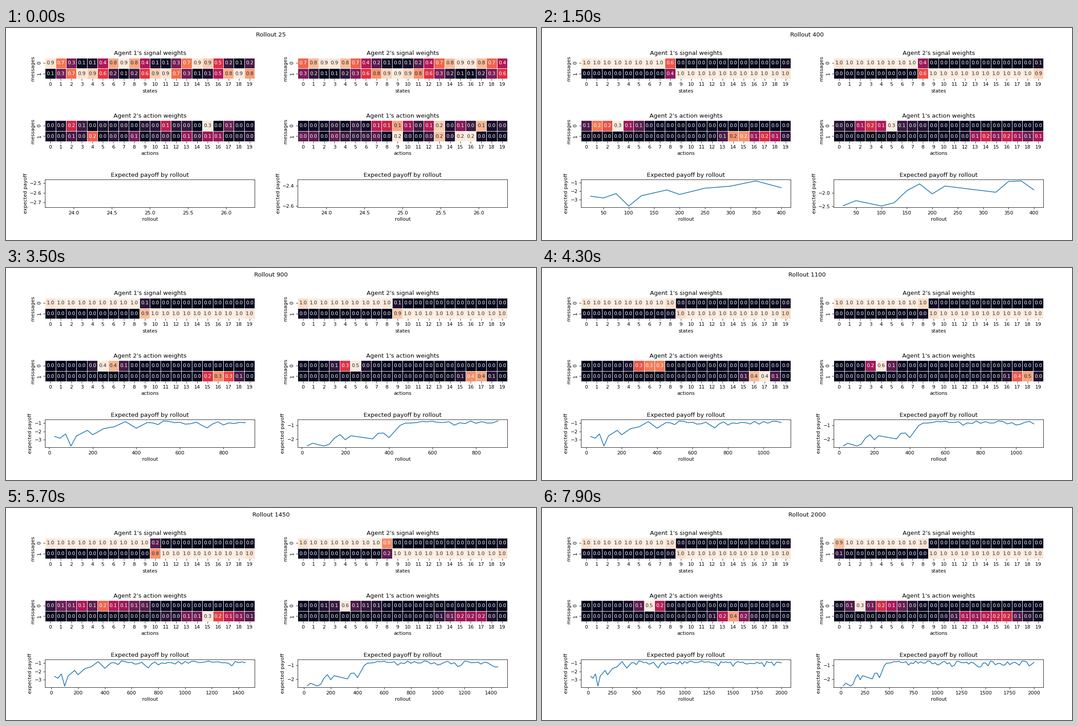
These frames come from a looping animation (1183 by 473 pixels, 8 s). A matplotlib script:

```python
import numpy as np
import matplotlib.pyplot as plt
from matplotlib.animation import FuncAnimation
from matplotlib.colors import LinearSegmentedColormap

W, H = 1183, 473
DPI = W / 15
FRAMES, STEP, N = 80, 25, 20
STATES = np.arange(N)
LEARNED = 15                                  # frames until behaviour settles
TIMES = [400, 700, 1100, 1450, 1675, 2000]    # rollouts of the key points

plt.rcParams.update({"font.family": "DejaVu Sans", "font.size": 10})
ROCKET = LinearSegmentedColormap.from_list("rocket", [
    "#03051a", "#35193e", "#701f57", "#ad1759",
    "#e13342", "#f37651", "#f6b48f", "#faebdd"])


def wander(rng, shape):
    """Noise over time, slightly smoothed between frames."""
    z = rng.normal(size=(FRAMES + 2,) + shape)
    return (z[:-2] + 1.5 * z[1:-1] + z[2:]) / 2


def progress(n):
    return min(n / LEARNED, 1)


def signal_rule(seed, cuts, period, peak):
    """A wave of preferences that settles into one cut between messages."""
    wave = .5 + .45 * np.cos(2 * np.pi * (STATES - peak) / period)
    start = np.log(wave / (1 - wave))
    edge = np.isin(STATES, [0, N - 1])
    noise = wander(np.random.default_rng(seed), (N,)) * np.where(edge, .6, .3)

    def values(n):
        cut = np.interp(STEP * (n + 1), TIMES, cuts)
        goal = np.clip(7 * (cut - STATES), -6, 6) * np.where(edge, .6, 1)
        g = progress(n)
        p = 1 / (1 + np.exp(-(1 - g) * start - g * (goal + noise[n])))
        return np.array([p, 1 - p])
    return values


def action_rule(seed, low, high, widths):
    """Random weights that gather into one moving bump per message."""
    rng = np.random.default_rng(seed)
    start = rng.normal(0, 1.1, (2, N))
    noise = wander(rng, (2, N)) * .4

    def values(n):
        t = STEP * (n + 1)
        centers = np.array([[np.interp(t, TIMES, c)] for c in (low, high)])
        width = np.interp(t, TIMES, widths)
        goal = -((STATES - centers) / width) ** 2 / 2 + noise[n]
        g = progress(n)
        w = np.exp((1 - g) * start + g * np.maximum(goal, -5))
        return w / w.sum(1, keepdims=True)
    return values


def payoff_curve(seed, points, best, spread):
    """Early climb through a few points, then a noisy plateau."""
    t = STEP * np.arange(1, FRAMES + 1)
    x, y = zip(*points)
    plateau = -best - np.random.default_rng(seed).gamma(2.5, spread, FRAMES)
    return np.where(t <= x[-1], np.interp(t, x, y), plateau)


def text_color(rgba):
    c = rgba[:3]
    lin = np.where(c <= .03928, c / 12.92, ((c + .055) / 1.055) ** 2.4)
    return ".15" if lin @ [.2126, .7152, .0722] > .408 else "w"


fig = plt.figure(figsize=((W + 1e-6) / DPI, (H + 1e-6) / DPI), dpi=DPI,
                 facecolor="white")
heading = fig.suptitle("")


def add_axes(x, y, h, title, xlabel, ylabel):
    ax = fig.add_axes([x / W, 1 - (y + h) / H, 467.9 / W, h / H])
    ax.set(title=title, xlabel=xlabel, ylabel=ylabel)
    return ax


class Heatmap:
    def __init__(self, x, y, title, xlabel, values):
        self.values = values
        ax = add_axes(x, y, 46.8, title, xlabel, "messages")
        self.mesh = ax.pcolormesh(np.zeros((2, N)), cmap=ROCKET,
                                  edgecolors="white", linewidth=.5)
        ax.set(xlim=(0, N), ylim=(2, 0))
        ax.set_xticks(STATES + .5, STATES)
        ax.set_yticks([.5, 1.5], [0, 1], rotation="vertical")
        ax.spines[:].set_visible(False)
        self.labels = [ax.text(c + .5, r + .5, "", ha="center", va="center")
                       for r in range(2) for c in range(N)]

    def draw(self, n):
        data = self.values(n)
        self.mesh.set_array(data)
        self.mesh.set_clim(data.min(), data.max())
        colors = self.mesh.to_rgba(data).reshape(-1, 4)
        for label, v, rgba in zip(self.labels, data.flat, colors):
            label.set_text(f"{v:.1f}")
            label.set_color(text_color(rgba))


class Curve:
    def __init__(self, x, payoff):
        self.payoff = payoff
        self.ax = add_axes(x, 338.4, 61.6, "Expected payoff by rollout",
                           "rollout", "expected payoff")
        self.line, = self.ax.plot([], [], color="C0", lw=1.5)

    def draw(self, n):
        self.line.set_data(STEP * np.arange(1, n + 2), self.payoff[:n + 1])
        self.ax.relim()
        self.ax.autoscale_view()


def column(x, me, other, signals, acts, payoff):
    return [
        Heatmap(x, 66.7, f"Agent {me}'s signal weights", "states", signals),
        Heatmap(x, 206.4, f"Agent {other}'s action weights", "actions", acts),
        Curve(x, payoff),
    ]


left = column(
    87.3, 1, 2,
    signal_rule(3, [8.1, 9.1, 8.5, 9.8, 8.8, 8.5], period=7.3, peak=-.3),
    action_rule(4, low=[2.5, 5.4, 5.9, 4.5, 6, 6],
                high=[15.8, 15.8, 16.7, 15.5, 18, 14],
                widths=[1.6, .9, .75, 2.6, .9, .9]),
    payoff_curve(5, [(25, -2.607), (50, -2.82), (75, -2.3), (100, -3.77),
                     (125, -2.55), (175, -1.87), (200, -2.4), (250, -1.66),
                     (300, -1.42), (350, -.8), (400, -1.6), (450, -.92)],
                 best=.68, spread=.11))
right = column(
    651.3, 2, 1,
    signal_rule(7, [7.9, 8.8, 8.5, 8.2, 7.9, 8.4], period=13, peak=2.5),
    action_rule(8, low=[4, 5, 4, 4.5, 4.5, 3.5],
                high=[16.5, 15.6, 17.5, 15.5, 15.5, 14.5],
                widths=[2.2, .8, .7, 1.4, 3, 1.9]),
    payoff_curve(9, [(25, -2.475), (50, -2.29), (100, -2.49), (125, -2.37),
                     (150, -1.92), (175, -1.67), (200, -2.04), (225, -1.75),
                     (325, -1.98), (350, -1.58), (375, -1.56), (400, -1.89),
                     (450, -1.02)],
                 best=.64, spread=.09))


def update(n):
    heading.set_text(f"Rollout {STEP * (n + 1)}")
    for panel in left + right:
        panel.draw(n)
    return []


anim = FuncAnimation(fig, update, frames=FRAMES, init_func=lambda: update(0),
                     interval=100, repeat=True, repeat_delay=0, blit=False)
plt.show()
```
